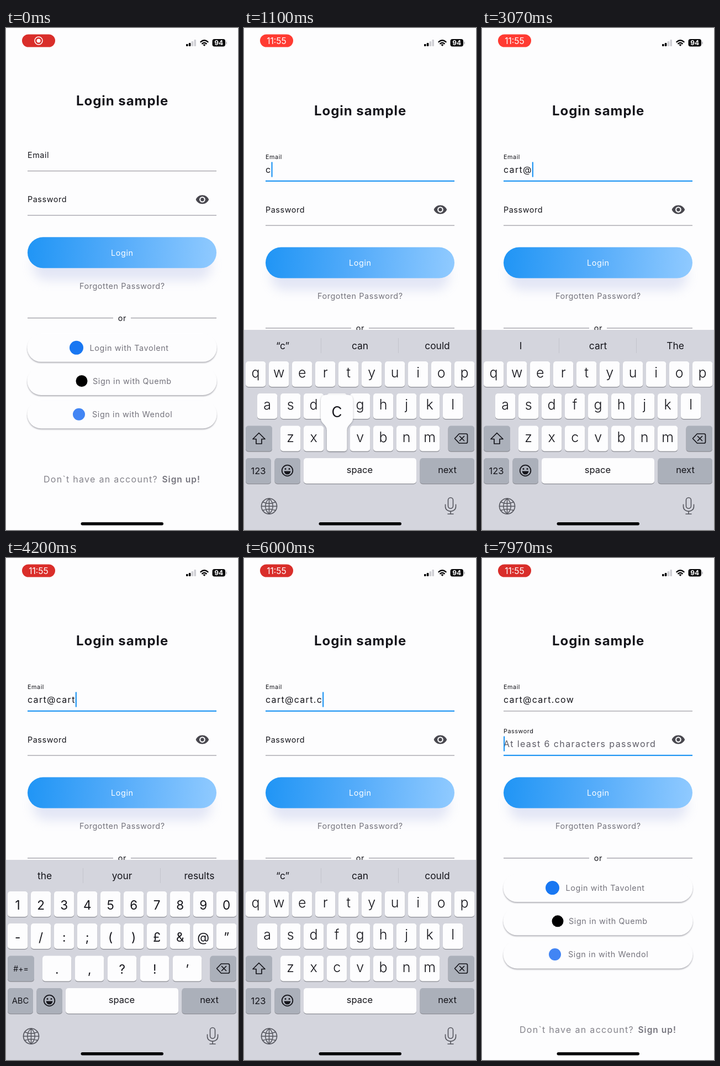
These frames come from a looping animation (420x908 px, 8000 ms). An HTML page:

```html
<!DOCTYPE html>
<html lang="en">
<head>
<meta charset="utf-8">
<title>Login sample</title>
<style>
html, body { margin: 0; width: 100%; height: 100%; overflow: hidden; background: #fdfdfe; }
svg { display: block; width: 100%; height: 100%; font-family: Inter, "Open Sans", sans-serif; }
</style>
</head>
<body>
<svg viewBox="0 0 420 908">
  <defs>
    <linearGradient id="blue" gradientUnits="userSpaceOnUse" x1="39" y1="396" x2="381" y2="416">
      <stop offset="0" stop-color="#2095f5"/>
      <stop offset="0.5" stop-color="#57adfa"/>
      <stop offset="1" stop-color="#90caff"/>
    </linearGradient>
    <filter id="soft" x="-20%" y="-60%" width="140%" height="240%"><feGaussianBlur stdDeviation="10"/></filter>
    <filter id="edge" x="-5%" y="-20%" width="110%" height="150%"><feGaussianBlur stdDeviation="0.9"/></filter>
    <filter id="pop" x="-20%" y="-20%" width="140%" height="140%">
      <feDropShadow dx="0" dy="1" stdDeviation="1.5" flood-color="#50525c" flood-opacity="0.5"/>
    </filter>
  </defs>
  <g id="scene"></g>
</svg>
<script>
const LOOP = 8000;
const INK = '#15151b', GRAY = '#74737c', WHITE = '#fdfdfe', BLUE = '#2196f3', RULE = '#9b9aa2', ICON = '#54555d';
const EMAIL_FOCUS = 440, PASSWORD_FOCUS = 7600;
const scene = document.getElementById('scene');
const pen = document.createElement('canvas').getContext('2d');

const clamp = v => Math.max(0, Math.min(1, v));
const ramp = (t, start, length) => clamp((t - start) / length);
const smooth = p => p * p * (3 - 2 * p);
const mix = (a, b, p) => a + (b - a) * p;
const latest = (list, t) => list.filter(item => item[0] <= t).pop();

// Timeline
const keystrokes = [
  [1050, 'c'], [1300, 'a'], [1550, 'r'], [1800, 't'], [2700, '@'],
  [3100, 'c'], [3300, 'a'], [3530, 'r'], [3750, 't'], [4800, '.'],
  [5650, 'c'], [6380, 'o'], [7150, 'w']
];
const pages = [[0, 'letters'], [2300, 'symbols'], [2900, 'letters'], [4050, 'symbols'], [5100, 'letters']];
const suggestions = [
  [0, 'I', 'The', 'I’m'],
  [1050, '“c”', 'can', 'could'], [1300, '“ca”', 'can', 'call'], [1550, '“car”', 'care', 'card'],
  [1800, '“cart”', 'carting', 'carted'], [2300, 'the', 'your', 'results'], [2900, 'I', 'cart', 'The'],
  [3100, '“c”', 'can', 'could'], [3300, '“ca”', 'can', 'call'], [3530, '“car”', 'care', 'card'],
  [3750, '“cart”', 'carting', 'carted'], [4050, 'the', 'your', 'results'], [5100, 'I', 'cart', 'The'],
  [5650, '“c”', 'can', 'could'], [6380, '“co”', 'considering', 'come'], [7150, '“cow”', 'cows', 'coward']
];

// Drawing helpers
const text = (x, y, str, size, fill = INK, extra = '') =>
  `<text x="${x}" y="${y}" font-size="${size}" fill="${fill}" ${extra}>${str.replace('&', '&amp;')}</text>`;
const spaced = (n, more = '') => `letter-spacing="${n}" ${more}`;
const middle = 'text-anchor="middle"';
const rect = (x, y, w, h, r, fill, extra = '') =>
  `<rect x="${x}" y="${y}" width="${w}" height="${h}" rx="${r}" fill="${fill}" ${extra}/>`;
const circle = (x, y, r, fill, extra = '') => `<circle cx="${x}" cy="${y}" r="${r}" fill="${fill}" ${extra}/>`;
const line = (d, stroke, width = 1.6, fill = 'none') =>
  `<path d="${d}" fill="${fill}" stroke="${stroke}" stroke-width="${width}" stroke-linejoin="round" stroke-linecap="round"/>`;
const shifted = (y, content) => `<g transform="translate(0 ${y})">${content}</g>`;

function statusBar(t) {
  const glow = smooth((1 - Math.cos(t / 1000 * Math.PI)) / 2);
  const clock = smooth(ramp(t, 600, 300));
  const bars = [4, 6, 9, 12].map((h, i) =>
    rect(326 + i * 4.8, 33 - h, 3.6, h, 1, i < 2 ? '#08080a' : '#cfcfd4')).join('');
  return rect(29, 11.5, 60, 23, 11.5, `rgb(${mix(217, 255, glow)},${mix(46, 59, glow)},${mix(42, 50, glow)})`)
    + `<g opacity="${1 - clock}">${circle(59, 23, 7, 'none', 'stroke="#fff" stroke-width="1.5"')}${circle(59, 23, 3.6, '#fff')}</g>`
    + text(59, 28.6, '11:55', 15.5, '#fff', `${middle} opacity="${clock}"`)
    + bars
    + line('M352.5 25.2Q359 19.2 365.5 25.2M355.2 28.3Q359 25 362.8 28.3', '#08080a', 2.4)
    + '<path d="M356.5 30.3Q359 28.4 361.5 30.3L359 33Z" fill="#08080a"/>'
    + rect(373.5, 20, 23.5, 13.5, 4, '#08080a') + rect(398, 24.5, 1.8, 5, 0.9, '#b0b0b6')
    + text(385.2, 31.2, '94', 12, '#fff', `${middle} font-weight="700"`);
}

function floatingLabel(name, y, focusTime, t) {
  const p = smooth(ramp(t, focusTime, 170));
  return text(39, mix(y, y - 16.3, p), name, mix(14.4, 10.8, p), INK, spaced(0.55));
}

function caret(value, y, since) {
  if (since % 1000 >= 500) return '';
  pen.font = '16px Inter, "Open Sans", sans-serif';
  const x = 39 + pen.measureText(value).width + value.length * 1.3;
  return rect(x, y, 2.2, 27.5, 1, BLUE);
}

function fields(t) {
  const onEmail = t >= EMAIL_FOCUS && t < PASSWORD_FOCUS, onPassword = t >= PASSWORD_FOCUS;
  const typed = keystrokes.filter(k => k[0] <= t);
  const value = typed.map(k => k[1]).join('');
  const hint = (y, str, start) => text(39, y, str, 16, '#5d5c66', spaced(1.4, `opacity="${ramp(t, start, 170)}"`));
  const underline = (y, on) => rect(39, on ? y - 1.2 : y - 0.6, 342, on ? 2.2 : 1.2, 0, on ? BLUE : RULE);
  let out = floatingLabel('Email', 235.2, EMAIL_FOCUS, t) + floatingLabel('Password', 315.4, PASSWORD_FOCUS, t)
    + underline(258.6, onEmail) + underline(338.8, onPassword);
  if (value) out += text(39, 243.6, value, 16, INK, spaced(1.3));
  else if (onEmail) out += hint(243.6, 'A valid email address', EMAIL_FOCUS);
  if (onEmail) out += caret(value, 224, t - (typed.length ? typed[typed.length - 1][0] : EMAIL_FOCUS));
  if (onPassword) out += hint(324, 'At least 6 characters password', PASSWORD_FOCUS) + caret('', 304, t - PASSWORD_FOCUS);
  return out + `<path transform="translate(342.6 297.4) scale(1.07)" fill="#49484f" fill-rule="evenodd"
    d="M12 4.5C7 4.5 2.7 7.6 1 12c1.7 4.4 6 7.5 11 7.5s9.3-3.1 11-7.5c-1.7-4.4-6-7.5-11-7.5zM12 17a5 5 0 1 1 0-10a5 5 0 0 1 0 10zM12 9a3 3 0 1 0 0 6a3 3 0 0 0 0-6z"/>`;
}

function socialButton(y, dotX, radius, color, textX, label) {
  return rect(38.5, y - 23, 343, 50, 25, '#b3b3b9', 'filter="url(#edge)"')
    + rect(38.5, y - 26, 343, 51, 25, WHITE)
    + circle(dotX, y - 0.5, radius, color)
    + text(textX, y + 4.8, label, 14.4, GRAY, spaced(0.6));
}

function form(t) {
  return text(210.6, 139.7, 'Login sample', 24, INK, spaced(0.95, `${middle} font-weight="700"`))
    + fields(t)
    + rect(48, 404, 324, 52, 26, '#98a4dc', 'filter="url(#soft)" opacity="0.26"')
    + rect(39, 378.3, 342, 56, 28, 'url(#blue)')
    + text(210.3, 411.8, 'Login', 14.4, '#fff', spaced(0.6, middle))
    + text(210.3, 471.8, 'Forgotten Password?', 14.4, GRAY, spaced(0.6, middle))
    + rect(39, 523.9, 155, 1.3, 0, RULE) + rect(226, 523.9, 155, 1.3, 0, RULE)
    + text(210.3, 530, 'or', 14.4, INK, spaced(0.6, middle))
    + socialButton(578.8, 127.5, 12.5, '#1877f2', 151.5, 'Login with Tavolent')
    + socialButton(639, 137, 10.5, '#000', 157, 'Sign in with Quemb')
    + socialButton(699.2, 132, 11, '#4285f4', 156, 'Sign in with Wendol');
}

const footer = () => text(68, 821.8, 'Don`t have an account?', 16, '#84838b', spaced(1.3))
  + text(282.5, 821.8, 'Sign up!', 15.5, GRAY, spaced(1, 'font-weight="600"'));

// Keyboard
const row = (chars, x, y, pitch = 42, w = 36.3) =>
  [...chars].map((char, i) => ({ char, x: x + i * pitch, y, w }));
const layouts = {
  letters: [...row('qwertyuiop', 3, 603), ...row('asdfghjkl', 24, 661), ...row('zxcvbnm', 66, 719.5)],
  symbols: [...row('1234567890', 3, 603), ...row('-/:;()£&@”', 3, 661), ...row('.,?!’', 66, 719.5, 59, 52.3)]
};
const keyCap = (x, y, w, fill) => rect(x, y + 1.3, w, 46, 5, '#8c8d94') + rect(x, y, w, 46, 5, fill);
const glyph = ({ char, x, y, w }) => /[a-z]/.test(char)
  ? text(x + w / 2, y + 29.2, char, 25, INK, `${middle} font-weight="300"`)
  : text(x + w / 2, y + 32.5, char, 22.5, INK, middle);

function keyPopup({ char, x, y, w }) {
  const l = x - 11, r = x + w + 11, e = x + w;
  return `<path filter="url(#pop)" fill="${WHITE}" d="M${x} ${y + 41}V${y + 8}C${x} ${y - 2} ${l} ${y - 4} ${l} ${y - 14}V${y - 46}q0 -10 10 -10H${r - 10}q10 0 10 10V${y - 14}C${r} ${y - 4} ${e} ${y - 2} ${e} ${y + 8}V${y + 41}q0 5 -5 5H${x + 5}q-5 0 -5 -5Z"/>`
    + text(x + w / 2, y - 16, char, 36, INK, `${middle} font-weight="300"`);
}

function keyboard(t) {
  const page = latest(pages, t)[1], letters = page === 'letters';
  const [, ...words] = latest(suggestions, t);
  const stroke = latest(keystrokes, t);
  const pressed = stroke && t - stroke[0] < 120 && layouts[page].find(k => k.char === stroke[1]);
  const dim = '#abb0ba';
  const label = (x, y, str, size = 16.5) => text(x, y, str, size, INK, middle);
  const out = rect(0, 546, 420, 362, 0, '#d4d5dd')
    + rect(139, 561, 1, 27, 0, '#c3c4cc') + rect(279, 561, 1, 27, 0, '#c3c4cc')
    + words.map((word, i) => label(70 + i * 140, 580.8, word, 17.4)).join('')
    + layouts[page].map(k => keyCap(k.x, k.y, k.w, WHITE) + (k === pressed ? '' : glyph(k))).join('')
    + keyCap(3, 719.5, 48, dim) + keyCap(369.5, 719.5, 47.5, dim)
    + keyCap(3, 778, 46, dim) + keyCap(55.5, 778, 46.5, dim)
    + keyCap(108, 778, 204, WHITE) + keyCap(318.5, 778, 98.5, dim)
    + (letters ? line('M27 732.5L38 743.5H32V752H22V743.5H16Z', INK, 1.7) : label(27, 747.5, '#+=', 14))
    + line('M389.5 734H402Q404.5 734 404.5 736.5V748.5Q404.5 751 402 751H389.5L381.5 742.5ZM390.5 738.5L398.5 746.5M398.5 738.5L390.5 746.5', INK, 1.7)
    + (letters ? label(26, 806.5, '123') : label(26, 806.2, 'ABC', 14.8))
    + circle(78.5, 800.5, 9.8, 'none', `stroke="${INK}" stroke-width="1.8"`)
    + circle(75, 797.5, 1.5, INK) + circle(82, 797.5, 1.5, INK)
    + `<path d="M72.5 801.5H84.5Q83.5 807.5 78.5 807.5T72.5 801.5Z" fill="${INK}"/>`
    + label(209.5, 805.2, 'space') + label(368, 805.2, 'next')
    + circle(45.5, 865, 14, 'none', `stroke="${ICON}" stroke-width="1.6"`)
    + line('M45.5 851V879M31.5 865H59.5M34 857.5Q45.5 862 57 857.5M34 872.5Q45.5 868 57 872.5M45.5 851C36.5 859 36.5 871 45.5 879M45.5 851C54.5 859 54.5 871 45.5 879', ICON, 1.5)
    + rect(369.5, 849.5, 9, 19.5, 4.5, 'none', `stroke="${ICON}" stroke-width="1.6"`)
    + line('M364.5 862V865.5C364.5 877 383.5 877 383.5 865.5V862M374 874V879M369 879H379', ICON);
  return pressed ? out + keyPopup(pressed) : out;
}

function draw(now) {
  const t = now % LOOP;
  const lift = smooth(ramp(t, EMAIL_FOCUS, 70));
  const hidden = Math.max((1 - ramp(t, EMAIL_FOCUS, 440)) ** 3, smooth(ramp(t, PASSWORD_FOCUS, 320)));
  scene.innerHTML = rect(0, 0, 420, 908, 0, WHITE)
    + shifted(18.3 * lift, form(t)) + shifted(36.8 * lift, footer())
    + (hidden < 1 ? shifted(362 * hidden, keyboard(t)) : '')
    + rect(135.5, 894, 149.5, 5.5, 2.75, '#050507') + statusBar(t);
}

const start = performance.now();
function tick() {
  draw(performance.now() - start);
  requestAnimationFrame(tick);
}
tick();
</script>
</body>
</html>
```
